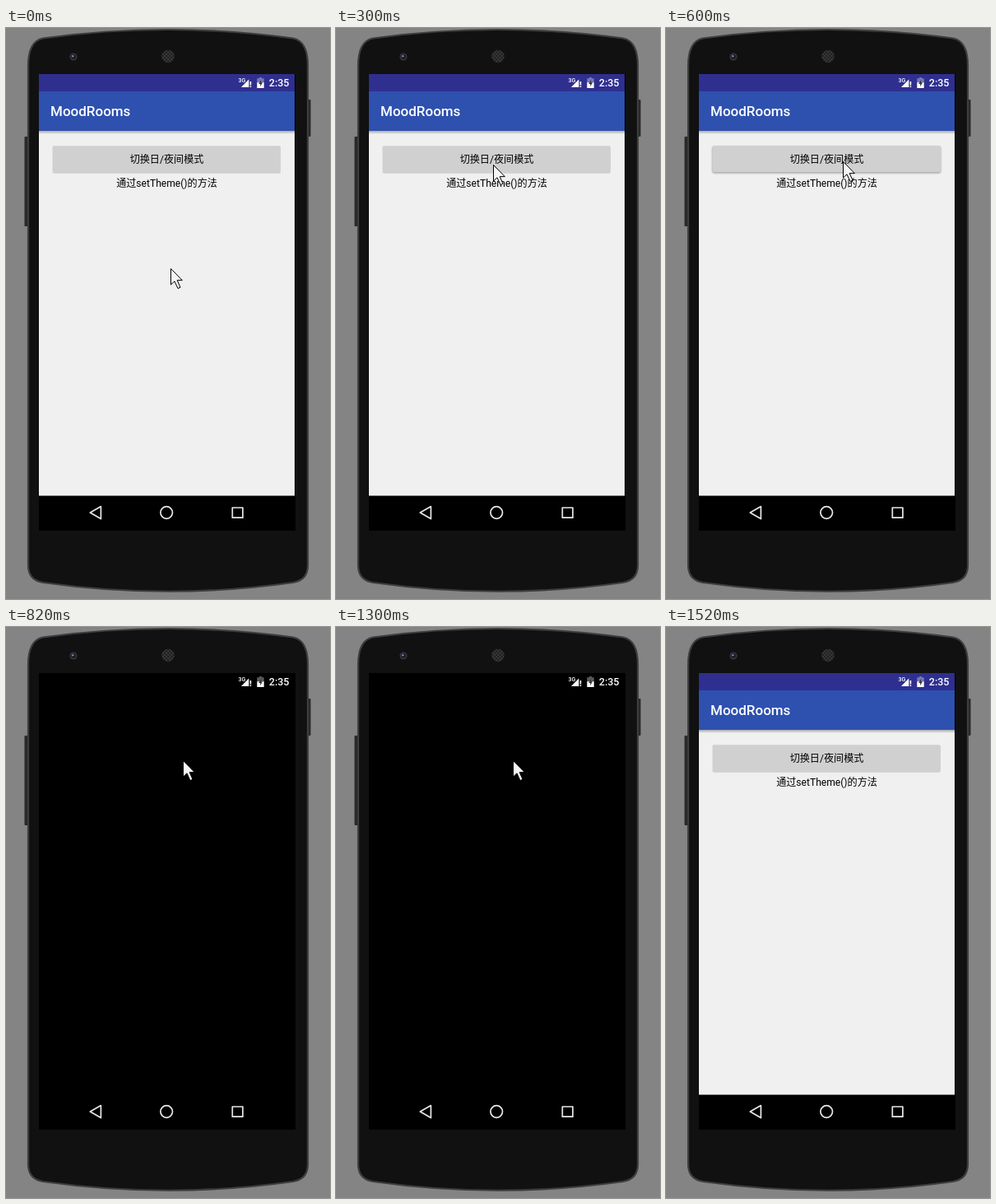
An HTML page for the animation above (1.72 s loop, 394 by 694 pixels).

```html
<!DOCTYPE html>
<html lang="zh-CN">
<head>
<meta charset="utf-8">
<title>Day and night mode</title>
<style>
  html, body { margin: 0; width: 100%; height: 100%; overflow: hidden; background: #848484; }
  svg { display: block; width: 394px; height: 694px; }
  text { font-family: Roboto, "Noto Sans CJK SC", "Noto Sans CJK", sans-serif; }
  .label { font-size: 12.1px; text-anchor: middle; fill: var(--ink); }
  .medium { font-weight: 500; fill: #fff; }

  .day   { --status: #2f2f90; --bar: #2e50af; --page: #f0f0f0; --ink: #000; --caption: #000; }
  .night { --status: #303030; --bar: #303030; --page: #303030; --ink: #f2f2f2; --caption: #fff; }
  .blank .app, .day .night-line, .night .day-shadow { display: none; }
  .status-bar { fill: var(--status); }
  .tool-bar { fill: var(--bar); }
  .page { fill: var(--page); }
  .caption { fill: var(--caption); }
  .button { fill: #d0d0d0; height: 33.5px; }
  .raised .button { height: 32px; filter: drop-shadow(0 1.2px .8px rgba(0, 0, 0, .4)); }
  #cursor { fill: #f5f5f5; stroke: #000; stroke-linejoin: miter; }
</style>
</head>
<body>
<svg id="stage" viewBox="0 0 394 694" class="day">
  <defs>
    <pattern id="mesh" width="3" height="3" patternUnits="userSpaceOnUse" patternTransform="rotate(45)">
      <rect width="3" height="3" fill="#191919"/>
      <circle cx="1.5" cy="1.5" r="1" fill="#515151"/>
    </pattern>
    <linearGradient id="fade" x2="0" y2="1">
      <stop stop-color="#000" stop-opacity=".3"/>
      <stop offset="1" stop-color="#000" stop-opacity="0"/>
    </linearGradient>
  </defs>

  <!-- Phone -->
  <rect width="394" height="694" fill="#848484"/>
  <rect x="22.5" y="132" width="5" height="109" rx="1" fill="#292929"/>
  <rect x="366" y="87" width="4.5" height="45" rx="1" fill="#292929"/>
  <path d="M27 46Q27 16 45 12.5Q197 -8.5 349 12.5Q367 16 367 46V653Q367 671 349 674Q197 695.5 45 674Q27 671 27 653Z"
        fill="#111" stroke="#3d3d3d" stroke-width="2.2"/>
  <circle cx="82" cy="35" r="4.6" fill="#34343a"/>
  <circle cx="82" cy="35" r="2.8" fill="#171722"/>
  <circle cx="81.3" cy="34.3" r="1.3" fill="#8080ac"/>
  <circle cx="197" cy="34.5" r="7.8" fill="url(#mesh)"/>
  <rect x="40" y="56" width="312" height="555"/>

  <!-- App -->
  <g class="app">
    <rect class="page" x="40" y="125" width="311" height="443.5"/>
    <rect class="status-bar" x="40" y="56" width="311" height="21"/>
    <rect class="tool-bar" x="40" y="77" width="311" height="48"/>
    <rect class="day-shadow" x="40" y="125" width="311" height="4" fill="url(#fade)"/>
    <rect class="night-line" x="42" y="124.5" width="306" height="2" fill="#1d1d1d"/>
    <text class="medium" x="54" y="107" font-size="17">MoodRooms</text>
    <rect class="button" x="56.5" y="143.3" width="277.5" rx="2"/>
    <text class="label" x="195.5" y="164">切换日/夜间模式</text>
    <text class="label caption" x="195.5" y="193">通过setTheme()的方法</text>
  </g>

  <!-- System icons -->
  <g fill="#fff">
    <text class="medium" x="282.5" y="65.5" font-size="7">3G</text>
    <path d="M286 72L295.3 62.5V72ZM296.6 65H298.2V69.6H296.6ZM296.6 70.6H298.2V72H296.6Z"/>
    <path d="M308 60H311V61.3H313.7V67H305.3V61.3H308Z" opacity=".35"/>
    <path d="M305.3 66.3H313.7V73H305.3Z"/>
    <path d="M310.2 62.8L307.2 67.9H309.2V71.3L312 66.3H310.2Z" fill="#333"/>
    <text class="medium" x="319.8" y="71" font-size="12.5">2:35</text>
  </g>
  <g fill="none" stroke="#e8e8e8" stroke-width="1.7" stroke-linejoin="round">
    <path d="M102.3 589L115.4 581.6V596.6Z"/>
    <circle cx="195.2" cy="589" r="7.3"/>
    <rect x="275.3" y="583" width="12.6" height="12.2"/>
  </g>

  <path id="cursor" d="M.5 .5V20L5 15.8L9 24.6L12 23.2L8.2 14.6H14.3Z"/>
</svg>
<script>
  const LOOP = 1720;
  const stage = document.getElementById("stage");
  const cursor = document.getElementById("cursor");

  // The pointer was sampled in steps: [start ms, x, y]
  const pointer = [
    [0, 200, 292], [100, 198, 262], [200, 194, 204],
    [300, 191, 166], [400, 199, 164], [500, 210, 162], [600, 215, 162]
  ];
  const looks = [
    [0, "day"], [600, "day raised"], [820, "blank"],
    [920, "night raised"], [1300, "blank"], [1400, "day raised"], [1460, "day"]
  ];
  const POINTER_GONE = 1520;

  const latest = (steps, time) => steps.filter(([start]) => start <= time).pop();

  function draw() {
    const time = performance.now() % LOOP;
    const [, x, y] = latest(pointer, time);
    stage.setAttribute("class", latest(looks, time)[1]);
    cursor.setAttribute("transform", `translate(${x} ${y})`);
    cursor.setAttribute("visibility", time < POINTER_GONE ? "visible" : "hidden");
    requestAnimationFrame(draw);
  }
  draw();
</script>
</body>
</html>
```
